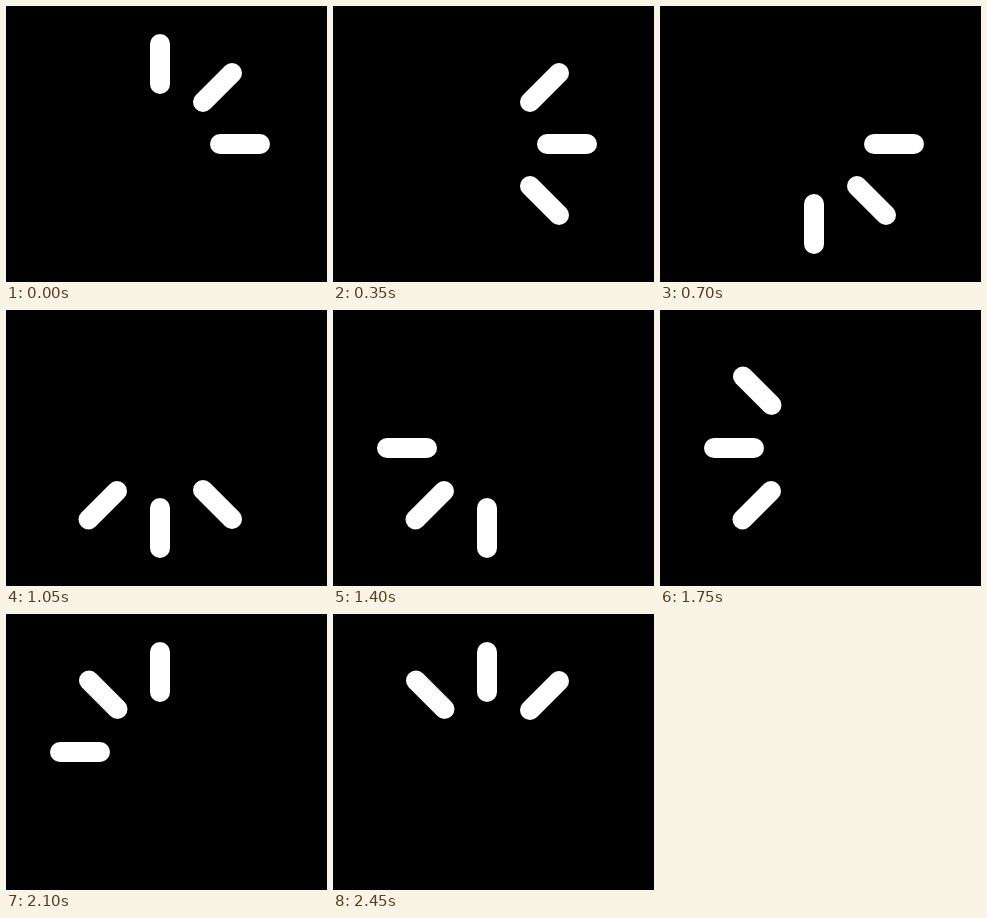
An HTML page for the animation above (2800 ms loop, 321 by 276 pixels).

```html
<!DOCTYPE html>
<html lang="en">
<head>
<meta charset="utf-8">
<title>Spinner</title>
<style>
  html, body { margin: 0; width: 100%; height: 100%; overflow: hidden; background: #000; }
  svg { display: block; width: 100vw; height: 100vh; }
  line {
    stroke: #fff;
    stroke-width: 20;
    stroke-linecap: round;
    animation: blink 2800ms step-end infinite;
    animation-delay: calc((var(--i) - 10) * 350ms);
  }
  /* Each bar stays lit for three of the eight steps. */
  @keyframes blink {
    0% { visibility: visible; }
    37.5%, 100% { visibility: hidden; }
  }
</style>
</head>
<body>
<svg viewBox="0 0 321 276">
  <g transform="translate(154 138)">
    <line style="--i:0" x1="0" y1="-60" x2="0" y2="-100"/>
    <line style="--i:1" x1="43" y1="-42" x2="72" y2="-71"/>
    <line style="--i:2" x1="60" y1="0" x2="100" y2="0"/>
    <line style="--i:3" x1="43" y1="42" x2="72" y2="71"/>
    <line style="--i:4" x1="0" y1="60" x2="0" y2="100"/>
    <line style="--i:5" x1="-43" y1="43" x2="-71.5" y2="71.5"/>
    <line style="--i:6" x1="-60" y1="0" x2="-100" y2="0"/>
    <line style="--i:7" x1="-42.5" y1="-43" x2="-71" y2="-71.5"/>
  </g>
</svg>
</body>
</html>
```
